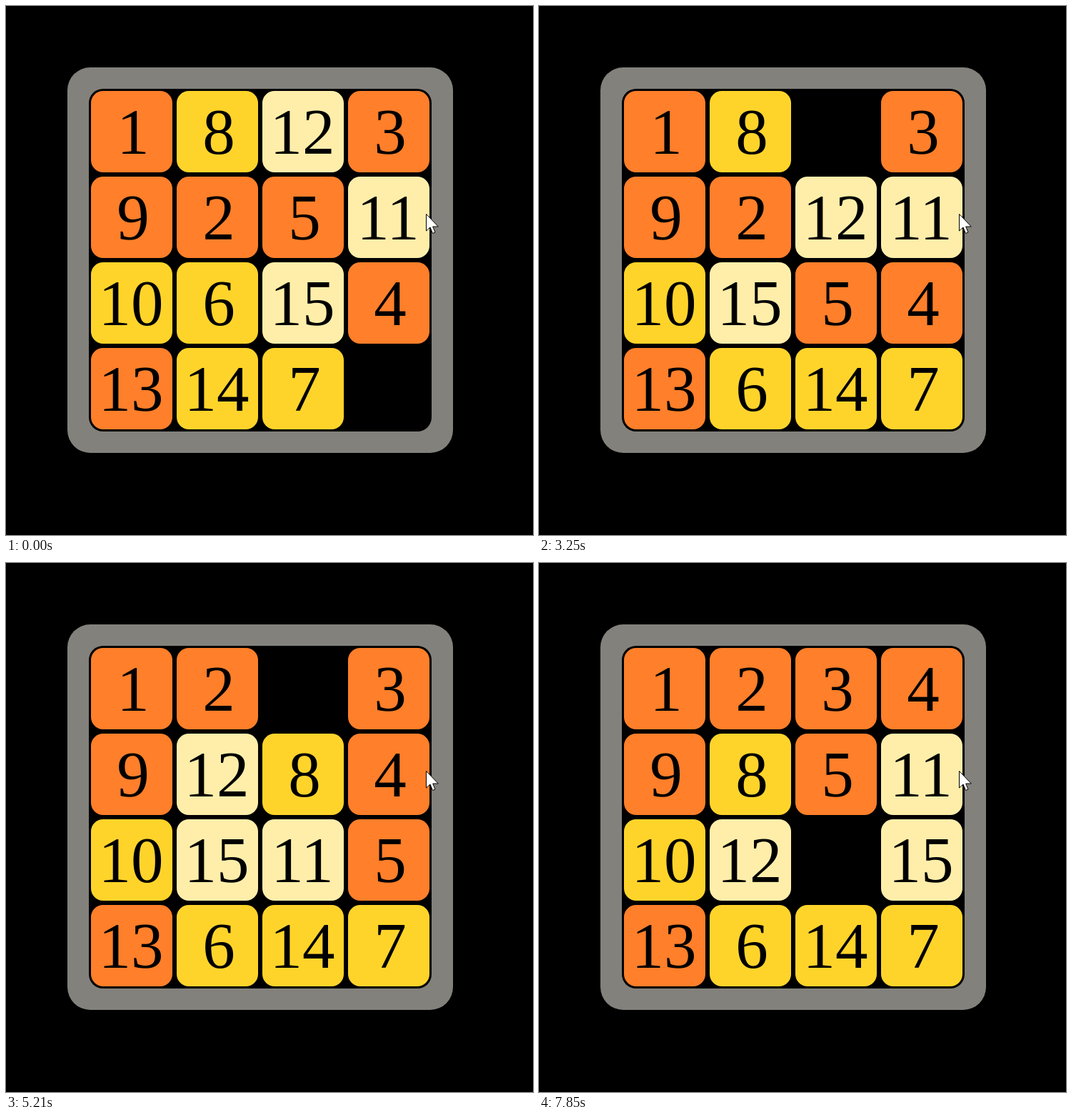
These frames come from a looping animation (738 px wide and 741 px high, 8 s). An HTML page with a canvas:

```html
<!DOCTYPE html>
<html lang="en">
<head>
<meta charset="utf-8">
<title>Fifteen puzzle</title>
<style>
  html, body { margin: 0; width: 100%; height: 100%; overflow: hidden; background: #000; }
  canvas { display: block; }
</style>
</head>
<body>
<canvas width="738" height="741"></canvas>
<script>
const ctx = document.querySelector('canvas').getContext('2d');
const LOOP = 8000, BEAT = 230, ORIGIN = 119, PITCH = 120, SIZE = 114;
const COLORS = ['#ff7f2a', '#ffd42a', '#ffeeaa'];

// One base-16 digit per cell, 0 is the gap
const START = '18c3925ba6f4de70';

// Gap moves, each after one beat or after the wait (ms) given with it
const STEP = { L: -1, R: 1, U: -4, D: 4 };
const MOVES = 'L920 L320 U1090 R460 U U L320 D R400 R150 D L250 U U150 R D D550 L L170 U R R D310 L'.split(' ');

function boardAt(t) {
  const board = [...START].map(digit => parseInt(digit, 16));
  let gap = board.indexOf(0);
  for (const move of MOVES) {
    t -= move.slice(1) || BEAT;
    if (t < 0) break;
    const next = gap + STEP[move[0]];
    board[gap] = board[next];
    board[next] = 0;
    gap = next;
  }
  return board;
}

function box(x, y, size, radius, color) {
  ctx.fillStyle = color;
  ctx.beginPath();
  ctx.roundRect(x, y, size, size, radius);
  ctx.fill();
}

function drawTile(n, cell) {
  if (!n) return;
  const x = ORIGIN + cell % 4 * PITCH;
  const y = ORIGIN + Math.floor(cell / 4) * PITCH;
  // Colour follows the ring of the tile's solved place
  const ring = Math.min((n - 1) % 4, Math.floor((n - 1) / 4));
  box(x, y, SIZE, 17, COLORS[ring]);
  ctx.fillStyle = '#000';
  ctx.fillText(n, x + SIZE / 2 + (n < 10 ? 2 : -1), y + 88);
}

function drawPointer() {
  ctx.setTransform(1, 0, 0, 1, 588.5, 291.5);
  const arrow = new Path2D('M0 0V23.5L5.5 18.5L9 27L12.5 25.5L9.2 17.5H16.8Z');
  ctx.fillStyle = '#fff';
  ctx.fill(arrow);
  ctx.strokeStyle = '#000';
  ctx.stroke(arrow);
  ctx.resetTransform();
}

function draw() {
  ctx.fillStyle = '#000';
  ctx.fillRect(0, 0, 738, 741);
  box(86, 86, 540, 32, '#82817c');
  box(116, 116, 480, 20, '#000');
  ctx.font = '91px "Liberation Serif", "Times New Roman", serif';
  ctx.textAlign = 'center';
  boardAt(performance.now() % LOOP).forEach(drawTile);
  drawPointer();
  requestAnimationFrame(draw);
}
draw();
</script>
</body>
</html>
```
